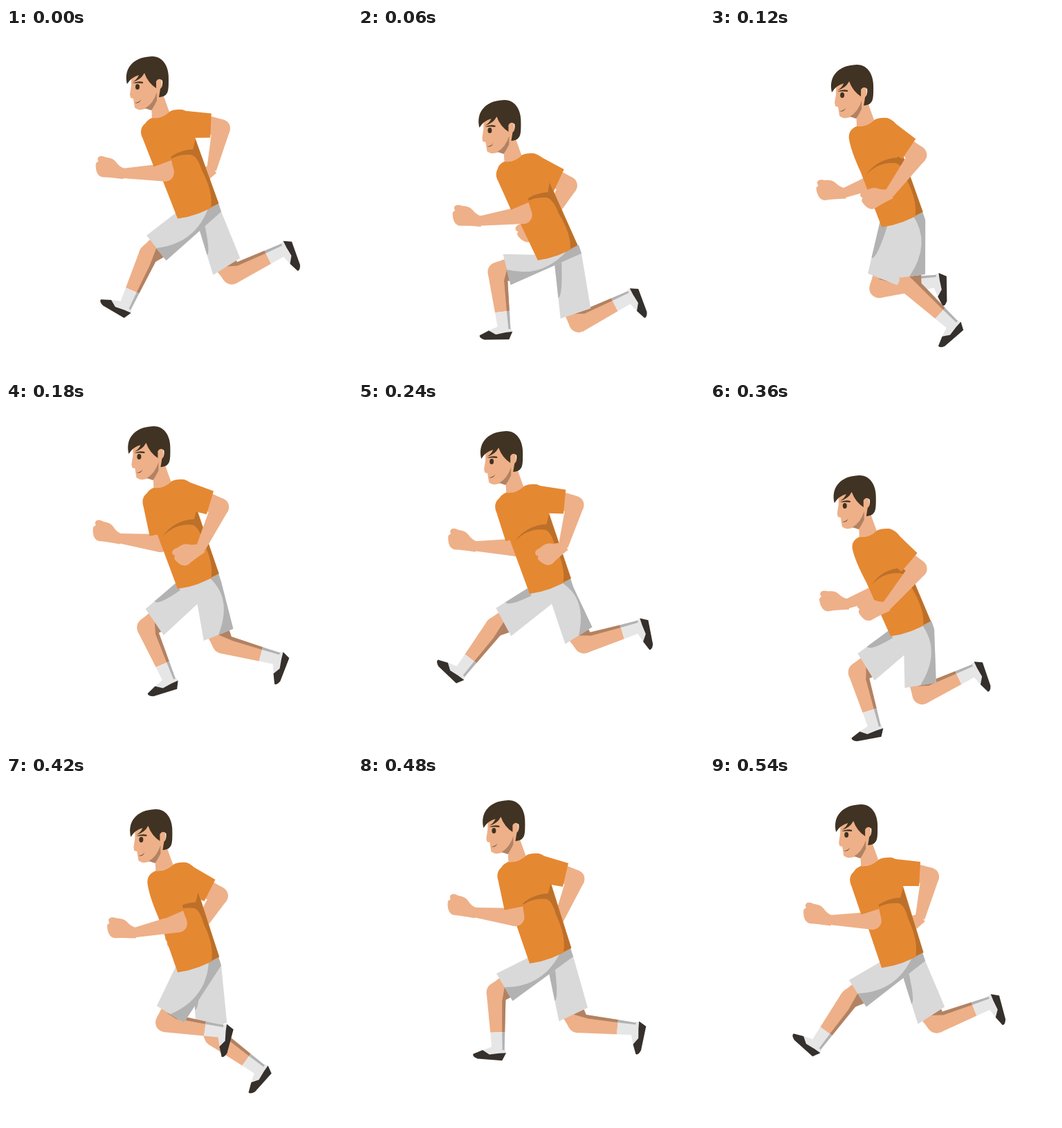
Recreate the animation shown at these times as an HTML page with a canvas. Size 500 by 500 pixels, loop 570 ms.

```html
<!DOCTYPE html>
<html lang="en">
<head>
<meta charset="utf-8">
<title>Runner</title>
<style>
html, body { margin: 0; width: 100%; height: 100%; overflow: hidden; background: #fff; }
canvas { display: block; width: 100vw; height: 100vh; }
</style>
</head>
<body>
<canvas id="stage" width="500" height="500"></canvas>
<script>
const ctx = document.getElementById('stage').getContext('2d');
const STEP = 30, STEPS = 19;
const SKIN = '#eeb088', SKIN_SHADE = '#b18263', SHIRT = '#e58832', SHIRT_SHADE = '#bc7029',
  HAIR = '#403323', SHORTS = '#d9d9d9', SHORTS_SHADE = '#b2b2b2', SOCK = '#e6e6e6', SHOE = '#35302c';

// Evenly spaced poses of one side; the other side runs half a cycle later.
// Thigh and shin lean forward by these degrees; arm goes from 0 (front) to 1 (back).
const stride = [
  { thigh: 52, shin: 24, arm: .06 }, { thigh: 78, shin: -5, arm: .1 },
  { thigh: -3, shin: -44, arm: .7 }, { thigh: -20, shin: -70, arm: .86 },
  { thigh: -31, shin: -103, arm: .96 }, { thigh: -32, shin: -116, arm: 1 },
  { thigh: -20, shin: -117, arm: .83 }, { thigh: 18, shin: -102, arm: .3 },
  { thigh: 52, shin: -35, arm: 0 }, { thigh: 63, shin: 34, arm: .03 }];
// Height of the head over each footfall
const bounce = [41, 81, 104, 106, 53, 48, 35, 35, 42];

const shapes = {
  torso: 'M38 89Q26 94 27 106Q30 124 45 155L77 234Q108 230 136 212L101 118Q104 84 82 77Q70 76 63 80Q52 90 38 89Z',
  crease: 'M53 159Q68 136 98 134L101 120L136 212L125 217Q128 196 111 164Q104 143 95 142Q70 140 53 159Z',
  face: 'M8 26V42L6 55L7 60L11 61L13 74Q18 79 28 76L37 70L38 89Q52 91 63 80L54 55L50 20Z',
  jaw: 'M45 52V64Q40 74 37 78L28 75Q40 68 45 52Z',
  hair: 'M2 40C-3 20 8 1 38 0C56 0 63 18 62 34C62 50 62 58 48 59L50 47Q54 44 53 35Q48 30 44 36V46Q32 38 27 24Q22 34 10 37Q17 33 19 27Q8 30 2 40Z',
  brow: 'M10 39Q17 35 25 37L25 39Q17 38 10 39Z',
  eye: 'M14 44a3 4 0 1 1 6 0a3 4 0 1 1 -6 0Z',
  mouth: 'M13 67Q20 67 22 62Q20 69 13 67Z',
  hand: 'M3 -7Q-6 -8 -12 -14Q-17 -19 -28 -18Q-37 -20 -39 -15Q-39 -11 -37 -10Q-41 -8 -40 -4Q-37 11 -27 11Q-17 9 3 8Z',
  ankle: 'M-22 5L-8 -4L9 -4L12 2L2 6L-11 11Z',
  shoe: 'M12 1L9 13L-26 19Q-34 18 -34 14L-22 5L-11 9L2 4Z'
};
for (const name in shapes) shapes[name] = new Path2D(shapes[name]);

const add = (p, d, k = 1) => [p[0] + d[0] * k, p[1] + d[1] * k];
const mix = (p, q, k) => [p[0] + (q[0] - p[0]) * k, p[1] + (q[1] - p[1]) * k];
const bend = (p, q, r, k) => mix(mix(p, q, k), mix(q, r, k), k);
const clamp = (x, low, high) => Math.min(high, Math.max(low, x));
const radians = degrees => degrees * Math.PI / 180;
const hanging = degrees => [-Math.sin(radians(degrees)), Math.cos(radians(degrees))];
const backOf = ([x, y]) => [y, -x];

function paint(name, color) {
  ctx.fillStyle = color;
  ctx.fill(shapes[name]);
}

function polygon(color, ...points) {
  ctx.fillStyle = color;
  ctx.beginPath();
  for (const p of points) ctx.lineTo(...p);
  ctx.fill();
}

function dot(color, p, r) {
  ctx.fillStyle = color;
  ctx.beginPath();
  ctx.arc(...p, r, 0, 7);
  ctx.fill();
}

// Limb segment with a round start and a flat end
function segment(color, p, rp, q, rq) {
  const length = Math.hypot(q[0] - p[0], q[1] - p[1]);
  const n = [(q[1] - p[1]) / length, (p[0] - q[0]) / length];
  dot(color, p, rp);
  polygon(color, add(p, n, rp), add(q, n, rq), add(q, n, -rq), add(p, n, -rp));
}

function at([x, y], angle, draw) {
  ctx.save();
  ctx.translate(x, y);
  ctx.rotate(angle);
  draw();
  ctx.restore();
}

// Smooth curve through the poses of the stride
function pose(position) {
  const i = Math.floor(position), f = position - i, n = stride.length;
  const near = [-1, 0, 1, 2].map(k => stride[(i + k + n) % n]);
  const curve = key => {
    const [a, b, c, d] = near.map(p => p[key]);
    return b + f / 2 * (c - a + f * (2 * a - 5 * b + 4 * c - d + f * (3 * (b - c) + d - a)));
  };
  return { thigh: curve('thigh'), shin: curve('shin'), arm: clamp(curve('arm'), 0, 1) };
}

function drawArm({ arm }, head) {
  const place = (front, middle, back) => add(head, bend(front, middle, back, arm));
  const cuff = place([46, 156], [112, 146], [123, 100]);
  const elbow = place([48, 169], [124, 160], [138, 104]);
  const wrist = place([-12, 162], [47, 223], [124, 164]);
  const twist = clamp((cuff[0] - head[0] - 55) / 50, 0, 1);
  const shoulder = add(head, mix([37, 109], [78, 98], twist));
  segment(SKIN, cuff, 13, elbow, 13);
  segment(SKIN, elbow, 13, wrist, 7);
  at(wrist, .25 - .9 * arm, () => paint('hand', SKIN));
  segment(SHIRT, shoulder, 15 + 5 * twist, cuff, 14 + 3.5 * twist);
}

function drawLeg({ thigh, shin }, hem, near) {
  const hip = add(hem, [30, near ? -5 : 4]), down = hanging(thigh), lower = hanging(shin);
  const across = backOf(down), calf = backOf(lower);
  const cuff = add(hip, down, 77), knee = add(hip, down, 91);
  const sockTop = add(knee, lower, 58), ankle = add(knee, lower, 84);
  const kneePit = add(add(knee, lower, 14), calf, 8);
  const cuffFront = add(cuff, across, -23), cuffBack = add(cuff, across, 23);
  const inset = clamp((cuff[0] - hem[0]) / 2, 0, 25);
  const hipFront = add(hem, [inset - 3, -8 - .3 * inset]);
  const hipBack = add(hem, [63, -10]), waist = add(hem, [59, -22]);

  segment(SKIN, cuff, 15, knee, 14);
  segment(SKIN, knee, 14, sockTop, 10.5);
  polygon(SKIN_SHADE, add(knee, calf, 14), add(sockTop, calf, 10.5), add(sockTop, calf, 6.5), kneePit);
  polygon(SKIN_SHADE, cuff, add(cuff, across, 17), kneePit);
  polygon(SOCK, add(sockTop, calf, 10.5), add(ankle, calf, 9), add(ankle, calf, -9), add(sockTop, calf, -10.5));
  at(ankle, radians(shin + 16), () => {
    paint('ankle', SOCK);
    paint('shoe', SHOE);
  });
  polygon(SHORTS_SHADE, add(sockTop, calf, 10.5), add(ankle, calf, 9), add(ankle, calf, 6),
    add(sockTop, calf, 6.5));

  polygon(SHORTS, hipFront, cuffFront, cuffBack, hipBack, waist);
  ctx.fillStyle = SHORTS_SHADE;
  ctx.beginPath();
  if (near) {
    const top = add(hem, [45, -17]);
    ctx.moveTo(...top);
    ctx.quadraticCurveTo(...add(mix(top, cuff, .5), across, 30), ...cuff);
    for (const p of [cuffBack, hipBack, waist]) ctx.lineTo(...p);
  } else {
    const low = mix(hipFront, cuffFront, .7);
    ctx.moveTo(...hipFront);
    ctx.lineTo(...low);
    ctx.quadraticCurveTo(...add(low, across, 8), ...add(hipFront, across, 12));
  }
  ctx.fill();
}

function drawTorso(head, lean) {
  ctx.save();
  ctx.translate(...head);
  ctx.transform(1, 0, lean / 150, 1 - lean / 600, -lean * .567, lean * .142);
  paint('torso', SHIRT);
  paint('crease', SHIRT_SHADE);
  ctx.restore();
}

function drawHead() {
  paint('face', SKIN);
  paint('jaw', SKIN_SHADE);
  for (const name of ['hair', 'brow', 'eye', 'mouth']) paint(name, HAIR);
}

function render(now) {
  const step = Math.floor(now / STEP) % STEPS;
  const phase = step / STEPS * stride.length;
  const near = pose(phase), far = pose(phase + stride.length / 2);

  // The runner bends forward as he sinks and straightens slowly over the loop.
  const y = bounce[step % bounce.length], sink = clamp((y - 38) / 68, 0, 1);
  const lean = 13 * sink ** 2 - 2 - .4 * step;
  const hem = [248 + 13 * sink ** 3, y + 234 - lean / 4];
  const head = [hem[0] - 77 - lean, y];

  ctx.fillStyle = '#fff';
  ctx.fillRect(0, 0, 500, 500);
  drawArm(far, head);
  drawLeg(far, hem, false);
  drawLeg(near, hem, true);
  drawTorso(head, lean);
  at(head, 0, drawHead);
  drawArm(near, head);
}

const start = performance.now();
function loop() {
  render(performance.now() - start);
  requestAnimationFrame(loop);
}
loop();
</script>
</body>
</html>
```
